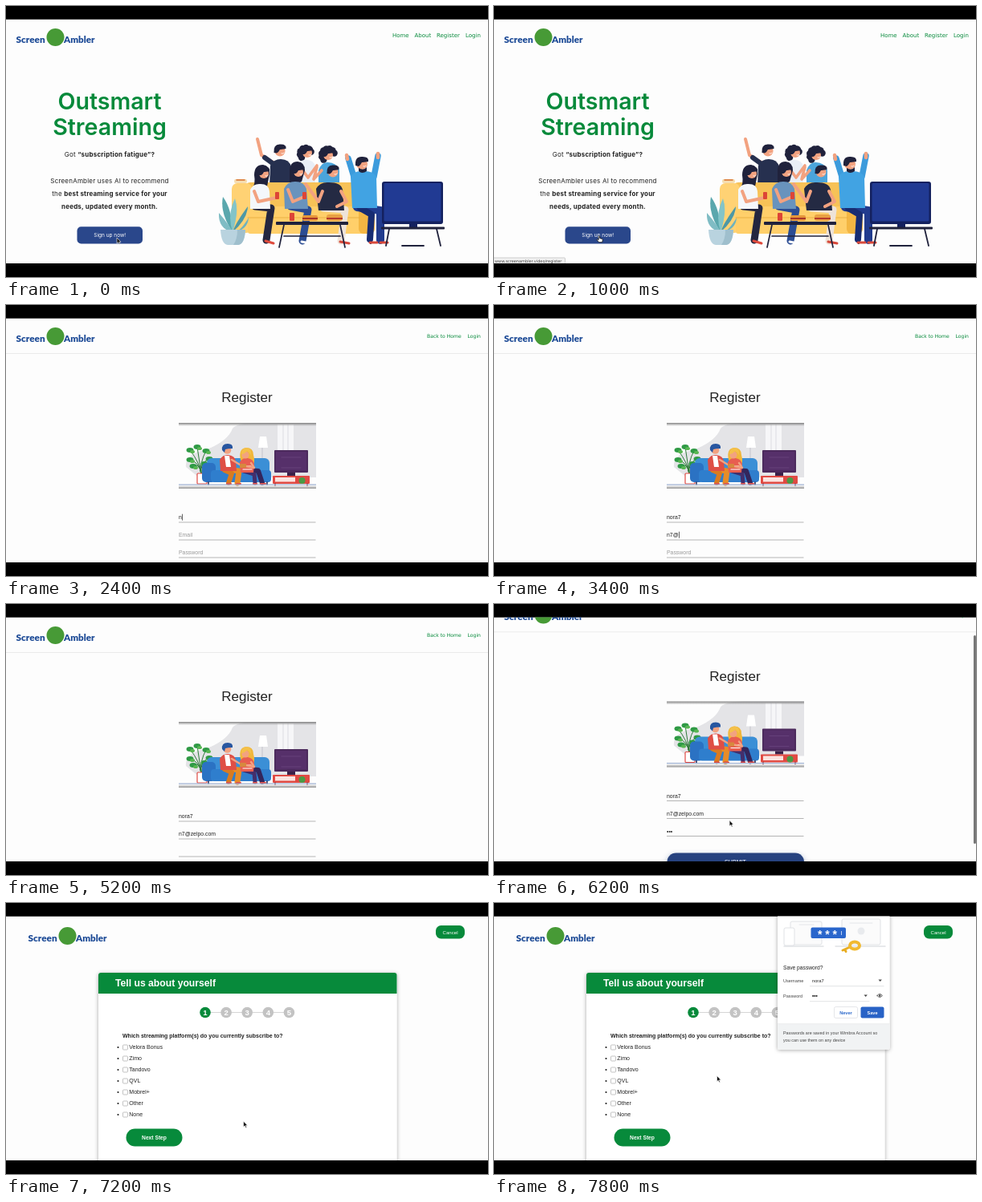
Recreate the animation shown at these times as an HTML page. Size 600 px wide and 338 px high, loop 8 s.

```html
<!DOCTYPE html>
<html lang="en">
<head>
<meta charset="utf-8">
<title>Sign-up walkthrough</title>
<style>
html, body { margin: 0; width: 100%; height: 100%; overflow: hidden; background: #000; }
svg { display: block; width: 100vw; height: 100vh; }
.sans { font-family: "Liberation Sans", Arial, sans-serif; }
.geo { font-family: Inter, sans-serif; }
.ui { font-family: "DejaVu Sans", Verdana, sans-serif; }
.logo { font-family: Lato, sans-serif; font-weight: 900; }
.b { font-weight: 700; }
.semi { font-weight: 600; }
.copy { letter-spacing: .2px; }
</style>
</head>
<body>
<svg id="stage" viewBox="0 0 600 338" xmlns="http://www.w3.org/2000/svg"></svg>
<script>
const LOOP = 8000, STEP = 200;
const GREEN = '#078a3b', NAVY = '#2a478b', SKIN = '#f2a280', INK = '#20223c';
const USER = 'nora7', MAIL = 'n7@zelpo.com';

// drawing helpers
const rect = (x, y, w, h, fill, rx = 0, more = '') =>
  `<rect x="${x}" y="${y}" width="${w}" height="${h}" rx="${rx}" fill="${fill}" ${more}/>`;
const disc = (x, y, r, fill) => `<circle cx="${x}" cy="${y}" r="${r}" fill="${fill}"/>`;
const oval = (x, y, rx, ry, fill) => `<ellipse cx="${x}" cy="${y}" rx="${rx}" ry="${ry}" fill="${fill}"/>`;
const shape = (d, fill) => `<path d="${d}" fill="${fill}"/>`;
const line = (d, color, w = 1) =>
  `<path d="${d}" fill="none" stroke="${color}" stroke-width="${w}" stroke-linecap="round" stroke-linejoin="round"/>`;
const text = (x, y, size, fill, str, cls = 'sans', anchor = 'start') =>
  `<text x="${x}" y="${y}" font-size="${size}" fill="${fill}" class="${cls}" text-anchor="${anchor}">${str}</text>`;
const group = (id, body, more = '') => `<g id="${id}" ${more}>${body}</g>`;
const bold = s => `<tspan class="b">${s}</tspan>`;

const logo = (dx, dy) => `<g transform="translate(${dx} ${dy})">` +
  disc(61.5, 39, 11, '#479a36') +
  text(12.5, 45.5, 11.8, '#1c4a96', 'Screen', 'logo') +
  text(72, 45.5, 11.6, '#1c4a96', 'Ambler', 'logo') + '</g>';

const face = (x, y, hair, r = 6) =>
  disc(x, y, r, SKIN) +
  shape(`M${x - r - 1} ${y + 2}q-1 ${-r - 5} ${r + 2} ${-r - 4}q${r + 1} 0 ${r} ${r - 1}q${-r} 1 ${-r - 1} 1q-2 4 -4 ${r - 2}z`, hair) +
  line(`M${x + 2} ${y + 3}q2 1 3 -1`, '#fff', .9);

const curls = (x, y, r, n) => Array.from({ length: n }, (_, i) => {
  const a = Math.PI * (.75 + 1.15 * i / (n - 1));
  return disc(x + r * Math.cos(a), y + r * Math.sin(a), 4.2, INK);
}).join('');

function sofaParty() {
  let s = '';
  // back row
  s += line('M334 196L318 186L313 166', SKIN, 4) + line('M333 197L322 189', '#26304f', 6);
  s += shape('M329 199q4 -8 13 -8q11 0 13 10v24h-27z', '#26304f') + face(341, 181, INK, 6.5);
  s += curls(373, 184, 7, 7) + shape('M362 200q4 -9 12 -8q9 0 11 8v22h-23z', '#e9eef6') + face(375, 183, INK);
  s += line('M368 203L376 214L387 199', SKIN, 3.6);
  s += curls(401, 186, 8, 8) + shape('M389 205q4 -11 12 -10q10 0 14 10v20h-26z', '#4ba5dc') + face(401, 186, INK);
  s += line('M393 205L383 216L387 201', SKIN, 3.6);
  // sofa
  s += rect(297, 220, 158, 50, '#f7c257', 7) + rect(281, 221, 25, 62, '#ffd274', 7);
  s += rect(301, 250, 155, 34, '#ffcf6a', 3) + rect(439, 247, 20, 37, '#f3b643', 6);
  s += line('M301 264H440', '#e5a93a', .8);
  s += rect(284, 216, 16, 5, '#f5ddb0', 2) + line('M287 217h10', '#d9722f', 1.5);
  s += line('M288 283l-2 13M452 283l2 13', INK, 2.2);
  // woman in white
  s += shape('M309 211q0 -13 11 -13q9 1 8 12l-3 15q-7 8 -19 3q5 -6 3 -17z', INK);
  s += line('M310 250L330 252L324 292', '#24263f', 9) + line('M323 293l10 3', '#df4b3d', 3);
  s += shape('M304 229q4 -8 13 -7q10 0 11 9l1 22h-25z', '#f4f7fb') + face(321, 209, INK);
  s += line('M309 231L314 244L337 239', SKIN, 4) + rect(335, 232, 5, 9, '#dd4436', 1);
  // woman in grey blue
  s += shape('M353 206q0 -12 10 -12q9 1 9 11l-4 14q-9 5 -15 0z', INK);
  s += line('M354 250L376 254L369 293', '#2c4d93', 9) + line('M368 294l10 2', '#fff', 3);
  s += shape('M346 228q4 -9 14 -9q11 0 14 9l2 25h-29z', '#6993bd') + face(364, 207, INK);
  s += line('M351 229L357 244L371 238', SKIN, 4) + rect(369, 232, 5, 9, '#dd4436', 1);
  // man in black
  s += line('M395 252L422 254L417 293', '#eee3d9', 9) + line('M416 294l11 2', '#d8493b', 3);
  s += shape('M386 228q5 -9 16 -8q15 0 17 9l2 26h-32z', '#242a43') + face(407, 207, INK, 6.5);
  s += line('M394 231L389 244L373 222', SKIN, 4) + line('M417 231L424 244L412 250', SKIN, 4);
  // cheering man
  s += line('M437 251L466 255L466 292', '#213b8e', 10) + line('M441 252L455 260L453 291', '#172c72', 8);
  s += line('M453 295h9M466 295h9', '#d8493b', 3);
  s += line('M433 213L426 190M458 213L463 187', '#3c9bdc', 7.5) + line('M425 191l-1 -5M463 189v-5', SKIN, 4.5);
  s += shape('M429 213q4 -8 15 -7q13 -1 17 7l1 39h-31z', '#41a3e3') + face(443, 197, INK, 7);
  s += shape('M439 202q6 4 10 -1v5q-6 4 -10 0z', INK);
  // coffee table and snacks
  s += rect(336, 269, 90, 4, INK, 1) + line('M346 273l-6 28M416 273l6 28M346 287h70', INK, 1.7);
  s += rect(369, 261, 19, 7, '#e5963a', 2) + rect(369, 264, 19, 2, '#a93627') +
       rect(399, 260, 20, 8, '#e8a043', 3) + rect(399, 264, 20, 2, '#b83a2a') + rect(353, 258, 6, 10, '#dd4436', 1);
  // plant
  const leaf = (x, y, bx, c) => shape(`M282 282Q${bx} ${y + 20} ${x} ${y}Q${x + (282 - x) * .4 + 7} ${y + 16} 282 282z`, c);
  s += leaf(270, 238, 266, '#5aa7ad') + leaf(285, 240, 275, '#83c4c8') + leaf(301, 250, 286, '#4d98a6') +
       leaf(265, 258, 264, '#7fbcc4') + leaf(302, 264, 290, '#6fb2bd');
  s += shape('M267 279h31q-1 18 -9 19h-13q-8 -1 -9 -19z', '#b9d3df') + shape('M288 279h10q-1 18 -9 19h-6q5 -7 5 -19z', '#9fbfcd');
  // television
  s += rect(468, 219, 76, 53, '#14215f', 3) + rect(470.5, 221, 71, 47.5, '#213a93', 1.5);
  s += rect(502, 271, 10, 5, '#14215f') + rect(467, 275.5, 79, 3, INK, 1);
  s += line('M477 278l-4 21M536 278l5 21M493 299h27', INK, 1.8);
  return s;
}

function livingRoom() {
  let s = rect(215, 147, 171, 82, '#fdfdfd');
  s += shape('M224 202Q222 186 250 180Q276 170 282 154Q288 147 310 147H386V215H240z', '#e4e4e7');
  s += rect(338, 149, 20, 44, '#f6f6f8') + line('M345 149v44M351 149v44', '#dcdce2', 1);
  s += line('M319 177V222M314 222h10', '#c3c4cc', 1) + shape('M316 164h8l2 14h-12z', '#fff');
  // plant
  const stem = (x, y) => line(`M243 211Q241 196 ${x} ${y}`, '#2e7a3a', 1);
  s += [[229, 181], [238, 177], [249, 182], [229, 193], [253, 192], [233, 201], [247, 198]]
    .map(([x, y]) => stem(x, y) + oval(x, y, 4.5, 3, '#2f9a45') + oval(x + 3, y + 2, 3, 2, '#58b652')).join('');
  s += rect(238, 210, 12, 13, '#fff', 1, 'stroke="#e04a43" stroke-width="1.2"');
  // sofa
  s += rect(250, 191, 78, 24, '#3b8fd6', 6) + rect(244, 197, 17, 24, '#2b72c3', 5) + rect(255, 206, 75, 15, '#2f7ecd', 4);
  s += line('M252 221v3M325 221v3', '#27335f', 1.6);
  // man
  s += line('M275 205L290 207L288 222', '#e78c28', 7) + line('M272 206L281 210L277 222', '#d97b20', 6);
  s += shape('M266 193q4 -7 11 -6q8 1 9 8l1 12h-20z', '#df4f45') + shape('M272 188h6l2 14h-6z', '#fff');
  s += disc(275.5, 181, 4.8, SKIN) + shape('M269 181q-1 -8 7 -8q7 0 6 6q-6 0 -9 1l-1 4z', '#2756a0');
  s += line('M281 193L291 199', SKIN, 2.6);
  // woman
  s += shape('M292 193q-3 -14 7 -15q9 0 9 9q3 10 -2 15q-9 2 -14 -9z', '#f0b73a');
  s += line('M301 206L314 207L319 222', '#33265c', 6) + line('M296 207L309 211L310 222', '#432f6c', 5);
  s += shape('M291 196q4 -6 10 -5q7 1 8 8l-1 10h-16z', '#e85e50') + line('M295 201h10M295 205h11', '#fff', 1.2);
  s += disc(298, 187, 4.5, SKIN) + shape('M293 186q0 -8 7 -8q6 1 5 9q-3 -4 -5 -5q-3 4 -7 4z', '#f4c04a');
  s += line('M305 197L309 203L298 201', SKIN, 2.4) + rect(291, 198, 8, 5, '#d6893e', 1);
  s += line('M317 223h6M308 223h4M287 223h5M275 223h5', '#e04a43', 2);
  // television
  s += rect(334, 181, 42, 28, '#4c2a5d', 1) + rect(336, 183, 38, 23, '#56306a');
  s += line('M343 190h24M343 203h24', '#75518a', .5);
  s += rect(350, 209, 10, 4, '#3a2149') + rect(332, 213, 46, 10, '#e04a43', 1) + rect(335, 215, 25, 5.5, '#fbe3df');
  s += disc(368.5, 219, 4, '#4a9a45') + line('M335 223v2M375 223v2', '#883040', 1.5);
  s += rect(215, 223.5, 171, 1.2, '#9db0d2');
  s += rect(215, 147, 171, 4, 'url(#top)') + rect(215, 225, 171, 4, 'url(#bottom)');
  return s;
}

function homePage() {
  const nav = [['Home', 481], ['About', 508.5], ['Register', 536], ['Login', 572]];
  const mid = (y, s) => text(129, y, 8, '#222', s, 'geo copy', 'middle');
  return logo(0, 0) + nav.map(([s, x]) => text(x, 39, 7, GREEN, s, 'ui')).join('') +
    text(129, 129, 28.6, GREEN, 'Outsmart', 'geo semi', 'middle') +
    text(129, 161, 28.6, GREEN, 'Streaming', 'geo semi', 'middle') +
    mid(188, 'Got ' + bold('“subscription fatigue”?')) +
    mid(221, 'ScreenAmbler uses AI to recommend') +
    mid(237, 'the ' + bold('best streaming service for your')) +
    mid(252.5, bold('needs, updated every month.')) +
    rect(88.5, 275.3, 81.5, 21.2, NAVY, 5) + text(129.2, 288, 6.5, '#fff', 'Sign up now!', 'geo', 'middle') +
    sofaParty();
}

const FIELD_Y = [267, 289, 311];
function registerPage() {
  return logo(0, 0) + text(524, 41, 6.1, GREEN, 'Back to Home', 'ui') + text(574.5, 41, 6.1, GREEN, 'Login', 'ui') +
    rect(0, 60, 600, .8, '#e6e6e6') +
    text(300, 121, 17, '#222', 'Register', 'sans', 'middle') + livingRoom() +
    FIELD_Y.map((y, i) => text(215, y, 6.9, '#999', '', `sans" id="field${i}`) + rect(215, y + 3.6, 170.5, .8, '#a3a3a3')).join('') +
    rect(0, 0, .7, 8, '#222', 0, 'id="caret"') +
    rect(215.5, 336, 170.5, 22, '#28427f', 11, 'filter="url(#glow)"') +
    text(300.5, 349, 7.1, '#fff', 'SUBMIT', 'sans', 'middle');
}

function surveyPage() {
  const options = ['Velora Bonus', 'Zimo', 'Tandovo', 'QVL', 'Mobrel+', 'Other', 'None'];
  let s = logo(15, 2) + rect(535, 28, 36, 16.5, GREEN, 6.5) + text(553, 38.5, 6.1, '#fff', 'Cancel', 'sans', 'middle');
  s += rect(115, 87, 371.5, 250, '#fff', 3, 'filter="url(#soft)"') + shape('M115 113V90q0 -3 3 -3H483.500q3 0 3 3V113z', GREEN);
  s += text(136, 104, 12.2, '#fff', 'Tell us about yourself', 'sans b') + rect(248, 136, 104, 1, '#d5d5d5');
  for (let i = 0; i < 5; i++) {
    const x = 248 + 26.1 * i;
    s += disc(x, 136.5, 6.8, i ? '#c3c3c3' : GREEN) + text(x, 140, 9.6, '#fff', i + 1, 'sans b', 'middle');
  }
  s += text(145, 168, 7, '#222', 'Which streaming platform(s) do you currently subscribe to?', 'sans b');
  options.forEach((name, i) => {
    const y = 182 + 14 * i;
    s += disc(139.5, y - 2, 1.1, '#222') + text(153.3, y, 7, '#222', name) +
      rect(145.5, y - 5, 6, 6, '#fff', 1, 'stroke="#aaa" stroke-width=".7"');
  });
  return s + rect(149.5, 281.5, 70, 22, GREEN, 11) + text(184.5, 294.7, 6.7, '#fff', 'Next Step', 'sans b', 'middle');
}

function passwordPopup() {
  const row = (label, y, end) => text(360, y, 5.5, '#444', label) +
    rect(393, y + 5, end - 393, .6, '#cfd1d4') + shape(`M${end - 7} ${y - 3}h4.400l-2.200 2.400z`, '#444');
  let s = rect(353, 10, 139.500, 172.500, '#fff', 2, 'filter="url(#soft)"');
  s += rect(369, 23, 39, 29, '#fbfbfb', 2, 'stroke="#e0e2e5"') + rect(433, 20, 48, 32, '#fbfbfb', 2, 'stroke="#e0e2e5"') +
    rect(361, 31, 13, 22, '#fff', 2, 'stroke="#e0e2e5"') + line('M425 54H487M361 54H410', '#e0e2e5', 1.5) +
    disc(457, 35, 4.5, '#e9ebee') + line('M380 27h18M443 25h28', '#e4e6e9', 1);
  s += rect(394.500, 30.500, 43.500, 13.500, '#2a66cc', 2) + text(415, 44, 14, '#fff', '* * *', 'sans b', 'middle') + rect(432, 35, .7, 5, '#fff');
  s += line('M443 55L434 59M437 58l1 2.500', '#e8ad22', 3) +
    '<ellipse cx="449" cy="53" rx="6" ry="4.500" fill="none" stroke="#f1b92f" stroke-width="4"/>';
  s += text(360, 83, 6.7, '#222', 'Save password?') + row('Username', 98.500, 485.500) + row('Password', 117.500, 467.500);
  s += text(396, 98.500, 5.700, '#222', USER) + text(396, 117.500, 6.500, '#222', '•••', 'sans b');
  s += line('M477 115.500q3.200 -4 6.400 0q-3.200 4 -6.400 0z', '#444', .9) + disc(480.200, 115.500, 1.200, '#444');
  s += rect(423.500, 129.500, 29, 14, '#fff', 2, 'stroke="#dadce0" stroke-width=".7"') + rect(456.500, 129.500, 29, 14, '#2862c6', 2);
  s += text(438, 138.500, 5.600, '#2d69cb', 'Never', 'sans b', 'middle') + text(471, 138.500, 5.600, '#fff', 'Save', 'sans b', 'middle');
  s += rect(353, 151, 139.500, 31.500, '#f1f3f4', 1) + rect(353, 150.500, 139.500, .6, '#dfe1e4');
  return s + text(360, 164, 5.400, '#444', 'Passwords are saved in your Wimbra Account so') +
    text(360, 172.500, 5.400, '#444', 'you can use them on any device');
}

const shadow = (id, dy, blur, color, o) =>
  `<filter id="${id}" x="-20%" y="-60%" width="140%" height="260%"><feDropShadow dx="0" dy="${dy}" stdDeviation="${blur}" flood-color="${color}" flood-opacity="${o}"/></filter>`;
const fade = (id, a, b) =>
  `<linearGradient id="${id}" x2="0" y2="1"><stop stop-color="#777" stop-opacity="${a}"/><stop offset="1" stop-color="#777" stop-opacity="${b}"/></linearGradient>`;

const stage = document.getElementById('stage');
stage.innerHTML =
  `<defs>${shadow('soft', 1, 2.5, '#000', .35)}${shadow('glow', 3, 3.5, '#28427f', .5)}${fade('top', .9, 0)}${fade('bottom', 0, .8)}
  <clipPath id="view"><rect y="16.500" width="600" height="304.500"/></clipPath></defs>` +
  rect(0, 0, 600, 338, '#000') +
  `<g clip-path="url(#view)">` + rect(0, 16.5, 600, 304.5, '#fdfdfd') +
  group('home', homePage()) + group('register', registerPage()) + group('survey', surveyPage()) + group('popup', passwordPopup()) +
  group('status', rect(-2, 314, 0, 9, '#f1f1f1', 1, 'id="statusBox" stroke="#bbb" stroke-width=".7"') +
    text(1, 319.6, 5, '#444', '', 'ui" id="statusText')) +
  rect(597, 17, 3, 260, '#777', 1.5, 'id="bar"') +
  group('pointer',
    group('arrow', '<path d="M0 0V7.200L1.700 5.700L2.900 8.300L4 7.800L2.900 5.300H5z" fill="#111" stroke="#fff" stroke-width=".6"/>') +
    group('hand', '<path d="M-.8 .6q.8 -1 1.500 0V3l3 .8q.8 .3 .6 1.400L3.700 8H-.4L-2.800 5q0 -1 1 -.8l1 .8z" fill="#fff" stroke="#111" stroke-width=".8"/>')) +
  '</g>';

const el = id => document.getElementById(id);
const show = (id, on) => { el(id).style.display = on ? '' : 'none'; };
const clamp = v => Math.max(0, Math.min(1, v));
const typed = (str, t, from, per) => str.slice(0, Math.max(0, Math.floor((t - from) / per) + 1));

const MOVES = [[0, 138, 289], [600, 131, 286.5], [1600, 131, 287], [2200, 236, 264],
  [6000, 290, 262], [6600, 302, 292], [7000, 302, 292], [7600, 277.5, 215.5]];
function pointerAt(t) {
  let i = MOVES.findIndex(m => m[0] > t);
  if (i < 0) return MOVES[MOVES.length - 1].slice(1);
  const [t0, x0, y0] = MOVES[i - 1], [t1, x1, y1] = MOVES[i];
  const p = (t - t0) / (t1 - t0), e = p * p * (3 - 2 * p);
  return [x0 + (x1 - x0) * e, y0 + (y1 - y0) * e];
}

function drawForm(t) {
  const focus = t < 2200 ? -1 : t < 3000 ? 0 : t < 4800 ? 1 : 2;
  const values = [typed(USER, t, 2400, 120),
    typed(MAIL.slice(0, 3), t, 3000, 200) + typed(MAIL.slice(3), t, 3600, 120),
    typed('•••', t, 5400, 200)];
  ['Username', 'Email', 'Password'].forEach((hint, i) => {
    const f = el('field' + i);
    f.textContent = values[i] || (focus === i ? '' : hint);
    f.setAttribute('fill', values[i] ? '#222' : '#999');
  });
  show('caret', focus >= 0 && t % 1000 >= 400);
  if (focus >= 0) {
    const w = values[focus] ? el('field' + focus).getComputedTextLength() : 0;
    el('caret').setAttribute('x', 215.4 + w);
    el('caret').setAttribute('y', FIELD_Y[focus] - 6.3);
  }
}

function draw(time) {
  const t = Math.floor(time % LOOP / STEP) * STEP;
  show('home', t < 1400);
  show('register', t >= 1400 && t < 7000);
  show('survey', t >= 7000);
  show('popup', t >= 7400);
  if (t >= 1400 && t < 7000) drawForm(t);

  const scroll = clamp((t - 6000) / 400);
  el('register').setAttribute('transform', `translate(0 ${-51 * scroll})`);
  el('bar').setAttribute('y', 17 + 44 * scroll);
  show('bar', t >= 6200 && t < 7000);

  const link = t < 1400;
  show('status', t >= 400 && t < 2000);
  el('statusBox').setAttribute('width', link ? 90.5 : 201);
  el('statusText').textContent = link ? 'www.screenambler.video/register' : 'Connecting...';

  const [x, y] = pointerAt(t), hand = t >= 200 && t < 1800;
  el('pointer').setAttribute('transform', `translate(${x} ${y})`);
  show('pointer', t < 2400 || t >= 6200);
  show('hand', hand);
  show('arrow', !hand);
}

const start = performance.now();
function tick() {
  draw(performance.now() - start);
  requestAnimationFrame(tick);
}
tick();
</script>
</body>
</html>
```
